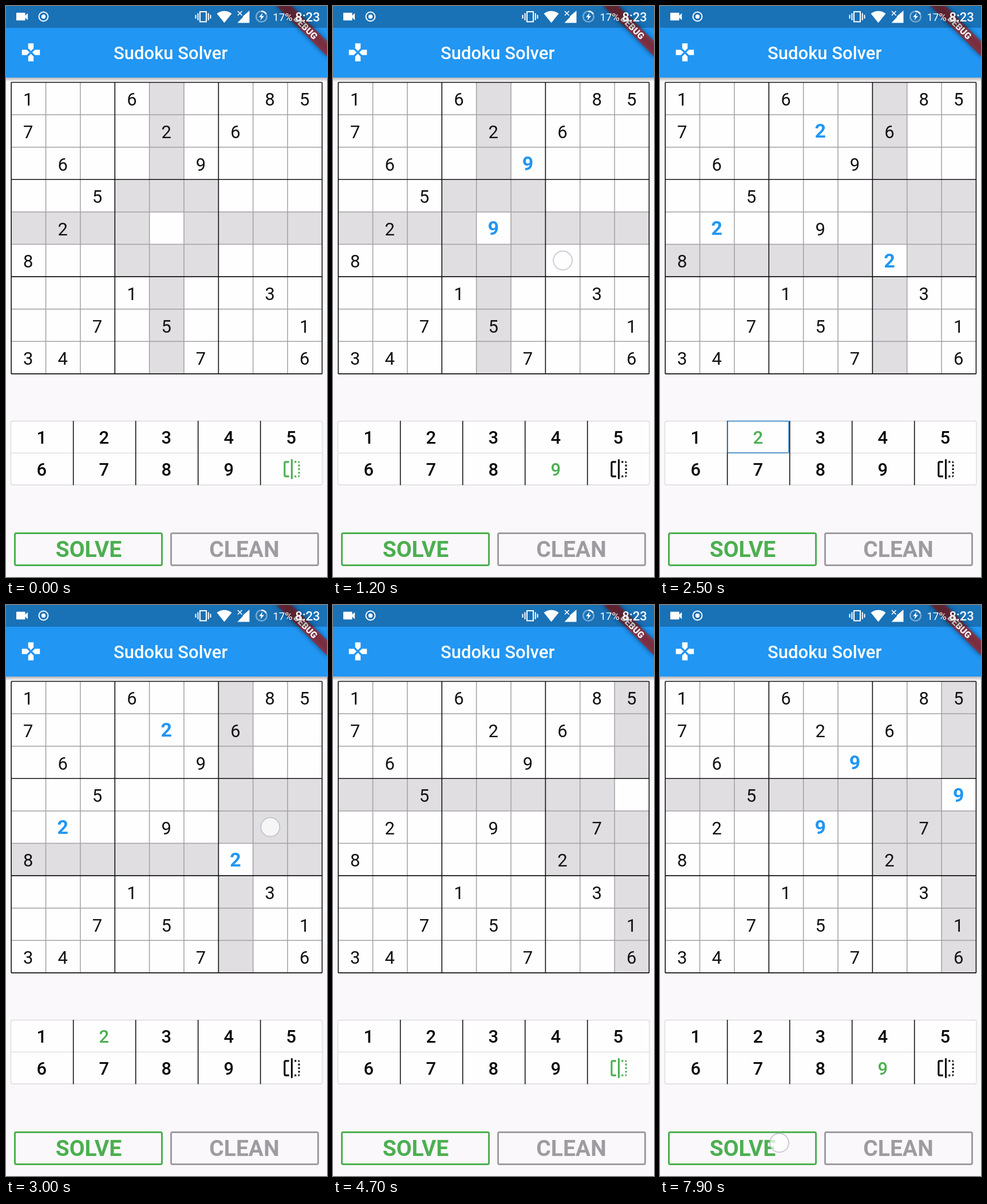
These frames come from a looping animation (561x998 px, 8000 ms). An HTML page:

```html
<!DOCTYPE html>
<html lang="en">
<head>
<meta charset="utf-8">
<title>Sudoku Solver</title>
<style>
  html, body { margin: 0; width: 100%; height: 100%; overflow: hidden; background: #faf8fb; }
  svg { display: block; width: 561px; height: 998px; font-family: Roboto, "Open Sans", sans-serif; }
  .mid { text-anchor: middle; }
  .digit { font-size: 31px; fill: #111; }
  .match { font-size: 34px; font-weight: 700; fill: #2196f3; }
  .key { font-size: 31px; font-weight: 500; fill: #0a0a0a; }
  .key.on { fill: #4caf50; }
  .btn { font-size: 39px; font-weight: 700; }
  .thin { stroke: #a2a0a3; stroke-width: 1.5; fill: none; }
  .bold { stroke: #111; stroke-width: 1.6; fill: none; }
</style>
</head>
<body>
<svg viewBox="0 0 561 998">
  <defs>
    <linearGradient id="drop" x2="0" y2="1">
      <stop offset="0" stop-color="#000" stop-opacity=".32"/>
      <stop offset="1" stop-color="#000" stop-opacity="0"/>
    </linearGradient>
    <filter id="soft" x="-20%" y="-60%" width="140%" height="220%"><feGaussianBlur stdDeviation="4"/></filter>
  </defs>
  <rect width="561" height="998" fill="#faf8fb"/>

  <rect y="124" width="561" height="8" fill="url(#drop)"/>
  <rect width="561" height="125" fill="#2196f3"/>
  <path transform="translate(24.6 62.2) scale(1.575)" fill="#fff" d="M15 7.5V2H9v5.5l3 3 3-3zM7.5 9H2v6h5.5l3-3-3-3zM9 16.5V22h6v-5.5l-3-3-3 3zM16.5 9l-3 3 3 3H22V9h-5.5z"/>
  <text class="mid" x="287.7" y="92.5" font-size="31" font-weight="500" fill="#fff">Sudoku Solver</text>

  <g transform="translate(561 0) rotate(45)">
    <rect x="-63" y="43.6" width="126" height="18.7" opacity=".5" filter="url(#soft)"/>
    <rect x="-63" y="43.6" width="126" height="18.7" fill="#b71c1c" opacity=".63"/>
    <text class="mid" y="58.6" font-size="15.9" font-weight="900" fill="#fff">DEBUG</text>
  </g>

  <rect width="561" height="38" opacity=".25"/>
  <g fill="#fff">
    <path transform="translate(14.6 5.1) scale(1.12)" d="M17 10.5V7c0-.55-.45-1-1-1H4c-.55 0-1 .45-1 1v10c0 .55.45 1 1 1h12c.55 0 1-.45 1-1v-3.5l4 4v-11l-4 4z"/>
    <circle cx="65.5" cy="18.5" r="8" fill="none" stroke="#fff" stroke-width="2"/>
    <circle cx="65.5" cy="18.5" r="3.7"/>
    <path d="M339 10h11v17.500h-11zM335.500 12.500v12.500M331.500 15.500v6.500M353.700 12.500v12.500M357.500 15.500v6.500" fill="none" stroke="#fff" stroke-width="2"/>
    <path d="M381.500 29.500 368.500 13.200Q381.500 4.500 394.500 13.200Z"/>
    <path d="M425.500 8v21.500H404.500L414 19.500V18Z"/>
    <path d="M405 9l7.500 7.500M412.500 9 405 16.500" stroke="#fff" stroke-width="1.7"/>
    <circle cx="446.500" cy="18.500" r="9.300" fill="none" stroke="#fff" stroke-width="2.600" opacity=".4"/>
    <path d="M446.500 9.200A9.300 9.300 0 0 1 454.600 14" fill="none" stroke="#fff" stroke-width="2.600"/>
    <path d="M448.500 12l-6.500 7.500h4l-1.500 5.500 6.700-7.600h-4.200z"/>
    <text x="466.500" y="25.500" font-size="18.500">17%</text>
    <text x="505.500" y="26.500" font-size="22" font-weight="500">8:23</text>
  </g>

  <g id="board"></g>
  <g id="pad"></g>

  <g class="btn mid" fill="none" stroke-width="3">
    <rect x="15.500" y="921.500" width="257" height="56" rx="2.500" stroke="#4caf50"/>
    <rect x="288.500" y="921.500" width="257" height="56" rx="2.500" stroke="#9e9ca0"/>
    <text x="144.500" y="963" fill="#4caf50" stroke="none">SOLVE</text>
    <text x="416.500" y="963" fill="#9e9ca0" stroke="none">CLEAN</text>
  </g>
  <g id="touch"></g>
</svg>
<script>
const LOOP = 8000, X0 = 9.2, Y0 = 133.5, W = 60.36, H = 56.6;
const givens = ['100600085', '700020600', '060009000', '005000000', '020000000',
                '800000000', '000100030', '007050001', '340007006'];
// each move: select a cell at sel, then enter n at put; (kx, ky) is the finger on the key
const moves = [
  { r: 4, c: 4, n: 9, sel: -1000, put: 500, kx: 385, ky: 825 },
  { r: 5, c: 6, n: 2, sel: 1300, put: 2500, kx: 172, ky: 757 },
  { r: 4, c: 7, n: 7, sel: 3100, put: 3800, kx: 172, ky: 812 },
  { r: 3, c: 8, n: 9, sel: 4500, put: 6200, kx: 403, ky: 804 }
];
const flip = 'M15 21h2v-2h-2v2zm4-12h2V7h-2v2zM3 5v14c0 1.1.9 2 2 2h4v-2H5V5h4V3H5c-1.1 0-2 .9-2 2zm16-2v2h2c0-1.1-.9-2-2-2zm-8 20h2V1h-2v22zm8-6h2v-2h-2v2zM15 5h2V3h-2v2zm4 8h2v-2h-2v2zm0 8c1.1 0 2-.9 2-2h-2v2z';

const nine = [...Array(9).keys()];
const colX = c => X0 + c * W, rowY = r => Y0 + r * H;
const rect = (x, y, w, h, rest) => `<rect x="${x}" y="${y}" width="${w}" height="${h}" ${rest}/>`;
const label = (cls, x, y, s) => `<text class="mid ${cls}" x="${x}" y="${y}">${s}</text>`;
const path = (cls, d) => `<path class="${cls}" d="${d}"/>`;
const box = n => Math.floor(n / 3);

function gridLines() {
  let thin = '', bold = '';
  for (let i = 0; i <= 9; i++) {
    const d = `M${colX(i)} ${Y0}V${rowY(9)}M${X0} ${rowY(i)}H${colX(9)}`;
    if (i % 3) thin += d; else bold += d;
  }
  return path('thin', thin) + path('bold', bold);
}
const lines = gridLines();

function drawBoard(t, cur) {
  const value = (r, c) => {
    const m = moves.find(m => m.r === r && m.c === c && t >= m.put);
    return m ? m.n : +givens[r][c];
  };
  const active = value(cur.r, cur.c);
  let fills = '', digits = '';
  for (const r of nine) for (const c of nine) {
    const self = r === cur.r && c === cur.c;
    const near = r === cur.r || c === cur.c || (box(r) === box(cur.r) && box(c) === box(cur.c));
    fills += rect(colX(c), rowY(r), W, H, `fill="${near && !self ? '#e0dee1' : '#fefefe'}"`);
    const v = value(r, c);
    if (!v) continue;
    const hit = v === active;
    digits += label(hit ? 'match' : 'digit', colX(c) + W / 2 - .6, rowY(r) + H / 2 + (hit ? 12 : 12.6), v);
  }
  return fills + lines + digits;
}

function drawPad(t, cur) {
  const active = t >= cur.put ? cur.n : 0;
  const keyX = i => 8.5 + 109 * (i % 5), keyY = i => i < 5 ? 725.5 : 781.5;
  let s = rect(8.5, 725.5, 544.5, 111.5, 'rx="3" fill="#fefefe" stroke="#dcdadd" stroke-width="1.3"')
        + path('', 'M8 781.3H553').replace('/>', ' stroke="#dcdadd" stroke-width="1.3"/>');
  const k = cur.n - 1;
  const down = t >= cur.put - 100 && t < cur.put;
  if (down) s += rect(keyX(k), keyY(k), 108, 55.5, 'fill="#eeedef"');
  for (let i = 1; i < 5; i++) s += path('bold', `M${8.7 + 109 * i} 725V837.500`);
  if (t >= cur.put - 100 && t < cur.put + 200)
    s += rect(keyX(k) + .5, keyY(k), 107, 55.5, 'rx="2" fill="none" stroke="#2a7fc4" stroke-width="1.5"');
  for (const i of nine)
    s += label(active === i + 1 ? 'key on' : 'key', keyX(i) + 53.7, keyY(i) + 39.5, i + 1);
  return s + `<path transform="translate(480.600 790.600) scale(1.575)" fill="${active ? '#111' : '#4caf50'}" d="${flip}"/>`;
}

function drawTouch(t) {
  const taps = [[208.5, 940, 7900, 8000]];
  for (const m of moves) {
    taps.push([colX(m.c) + W / 2, rowY(m.r) + H / 2, m.sel - 200, m.sel],
              [m.kx, m.ky, m.put - 200, m.put - 100]);
  }
  return taps.map(([x, y, from, to]) => {
    if (t >= from && t < to)
      return `<circle cx="${x}" cy="${y}" r="16.500" fill="#fff" fill-opacity=".72" stroke="#b9bcca" stroke-opacity=".8" stroke-width="1.800"/>`;
    if (t >= to && t < to + 100)
      return `<circle cx="${x}" cy="${y}" r="5" fill="#d3d2d5"/>`;
    return '';
  }).join('');
}

const shown = {};
function put(id, markup) {
  if (shown[id] === markup) return;
  shown[id] = markup;
  document.getElementById(id).innerHTML = markup;
}

const start = performance.now();
function frame(now) {
  const t = Math.max(0, now - start) % LOOP;
  const cur = moves.filter(m => t >= m.sel).pop();
  put('board', drawBoard(t, cur));
  put('pad', drawPad(t, cur));
  put('touch', drawTouch(t));
  requestAnimationFrame(frame);
}
frame(start);
</script>
</body>
</html>
```
